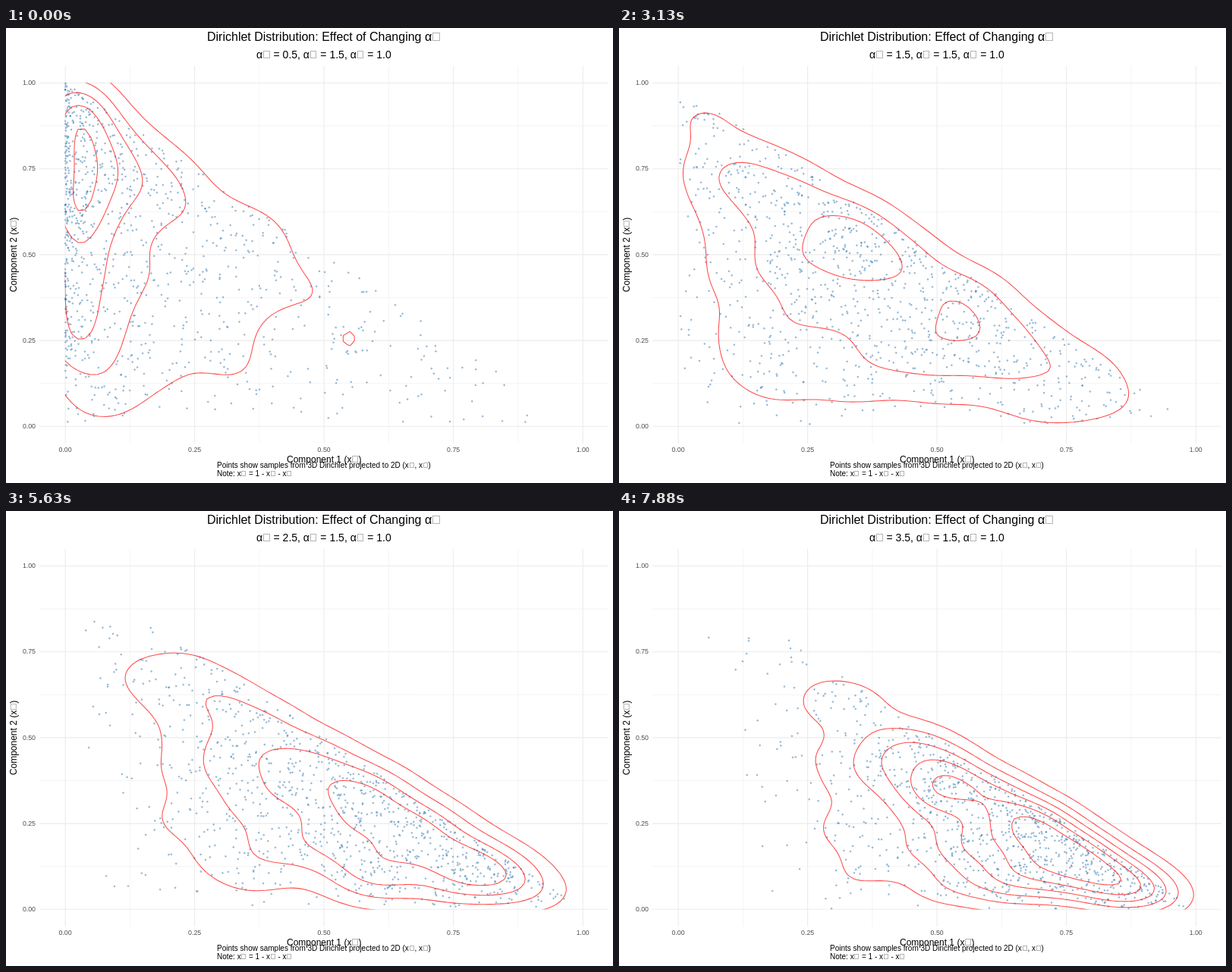
Animation of 800x600 px, one loop 8 s. Source, as an HTML page with a canvas:

```html
<!DOCTYPE html>
<html lang="en">
<head>
<meta charset="utf-8">
<title>Dirichlet Distribution</title>
<style>
html, body { margin: 0; width: 100%; height: 100%; overflow: hidden; background: #fff; }
canvas { position: absolute; left: 0; top: 0; }
p { position: absolute; margin: 0; line-height: 1; white-space: pre; color: #000;
    font-family: "Liberation Sans", Arial, sans-serif; }
i { display: inline-block; box-sizing: border-box; width: .6em; height: .7em;
    margin: 0 .0775em; border: 1px solid #b4b4b4; }
.tick { color: #4d4d4d; }
</style>
</head>
<body>
<canvas id="plot" width="800" height="600"></canvas>
<script>
const start = performance.now();
const STEP = 125, FRAMES = 64, STATES = 16, COUNT = 1000;
const ctx = document.getElementById('plot').getContext('2d');
const px = v => 78.1 + 682.1 * v;
const py = v => 525.3 - 452.8 * v;
const alpha = i => .5 + .2 * i;
const mix = (a, b, t) => [a[0] + (b[0] - a[0]) * t, a[1] + (b[1] - a[1]) * t];
const range = (n, f) => Array.from({ length: n }, (_, i) => f(i));

// ---- labels; "□" stands for a missing glyph box
const boxed = s => s.replace(/□/g, '<i></i>');
function label(text, x, base, size, shift = 0, cls = '') {
  const p = document.createElement('p');
  p.className = cls;
  p.innerHTML = boxed(text);
  p.style.cssText = `left:${x}px;top:${base - .8465 * size}px;font-size:${size}px;` +
    `transform:translateX(${shift}%);transform-origin:0 .8465em`;
  document.body.append(p);
  return p;
}
label('Dirichlet Distribution: Effect of Changing α□', 265, 18, 16);
const subtitle = label('', 330, 40, 14);
label('Component 1 (x□)', 370, 573, 12);
label('Component 2 (x□)', 14, 348.5, 12).style.transform = 'rotate(-90deg)';
label('Points show samples from 3D Dirichlet projected to 2D (x□, x□)', 278, 580, 10);
label('Note: x□ = 1 - x□ - x□', 278, 591, 10);
for (let v = 0; v <= 1; v += .25) {
  label(v.toFixed(2), px(v), 559.5, 8.8, -50, 'tick');
  label(v.toFixed(2), 39, py(v) + 3.2, 8.8, -100, 'tick');
}

// ---- random samples, one set per state
let seed = 20;
function rnd() {
  seed = seed + 0x6D2B79F5 | 0;
  let t = Math.imul(seed ^ seed >>> 15, 1 | seed);
  t = t + Math.imul(t ^ t >>> 7, 61 | t) ^ t;
  return ((t ^ t >>> 14) >>> 0) / 4294967296;
}
const normal = () => Math.sqrt(-2 * Math.log(1 - rnd())) * Math.cos(2 * Math.PI * rnd());
function gamma(a) {
  if (a < 1) return gamma(a + 1) * Math.pow(rnd(), 1 / a);
  const d = a - 1 / 3, c = 1 / Math.sqrt(9 * d);
  for (;;) {
    const x = normal(), v = (1 + c * x) ** 3;
    if (v > 0 && Math.log(1 - rnd()) < x * x / 2 + d - d * v + d * Math.log(v)) return d * v;
  }
}
function dirichlet(...shape) {
  const g = shape.map(gamma), sum = g.reduce((s, v) => s + v);
  return g.map(v => v / sum);
}

// ---- kernel density on a grid reaching past the unit square, so contours close
const G = 121, MIN = -.25, CELL = 1.5 / (G - 1);
const at = i => MIN + i * CELL;

function bandwidth(values) {
  const v = [...values].sort((a, b) => a - b), n = v.length;
  const mean = v.reduce((s, x) => s + x) / n;
  const sd = Math.sqrt(v.reduce((s, x) => s + (x - mean) ** 2, 0) / (n - 1));
  const iqr = v[Math.floor(n * .75)] - v[Math.floor(n * .25)];
  return 1.06 * Math.min(sd, iqr / 1.34) * n ** -.2;
}
// weights of one value on the grid nodes within four bandwidths
function kernel(v, h) {
  const from = Math.max(0, Math.ceil((v - 4 * h - MIN) / CELL));
  const to = Math.min(G - 1, Math.floor((v + 4 * h - MIN) / CELL));
  const w = range(to - from + 1, k =>
    Math.exp(-.5 * ((at(from + k) - v) / h) ** 2) / (h * Math.sqrt(2 * Math.PI)));
  return { from, w };
}
function density(points) {
  const z = new Float64Array(G * G);
  const hx = bandwidth(points.map(p => p[0])), hy = bandwidth(points.map(p => p[1]));
  for (const [x, y] of points) {
    const kx = kernel(x, hx), ky = kernel(y, hy);
    ky.w.forEach((wy, j) => {
      const row = (ky.from + j) * G + kx.from;
      for (let i = 0; i < kx.w.length; i++) z[row + i] += kx.w[i] * wy / points.length;
    });
  }
  return z;
}

// ---- marching squares: link each crossing to the next, then follow the links
function contour(z, level) {
  const link = new Map(), spot = new Map();
  for (let j = 0; j < G - 1; j++) for (let i = 0; i < G - 1; i++) {
    const n = j * G + i, corner = [n, n + 1, n + G + 1, n + G], cross = [];
    corner.forEach((a, k) => {
      const b = corner[(k + 1) % 4], inside = z[a] > level;
      if (inside === z[b] > level) return;
      const id = 2 * Math.min(a, b) + (Math.abs(a - b) === 1 ? 0 : 1);
      const node = m => [px(at(m % G)), py(at(Math.floor(m / G)))];
      spot.set(id, mix(node(a), node(b), (level - z[a]) / (z[b] - z[a])));
      cross.push({ id, inside });
    });
    cross.forEach((c, k) => {
      if (c.inside) link.set(c.id, cross[(k + 1) % cross.length].id);
    });
  }
  const loops = [];
  while (link.size) {
    const line = [];
    let id = link.keys().next().value;
    while (link.has(id)) {
      const next = link.get(id);
      line.push(spot.get(id));
      link.delete(id);
      id = next;
    }
    loops.push(line);
  }
  return loops.sort((a, b) => b.length - a.length).map(resample);
}

// even spacing, starting from the rightmost point, so loops can be blended
function resample(line) {
  const N = 300;
  const first = line.reduce((m, p, i) => p[0] > line[m][0] ? i : m, 0);
  const ring = [...line.slice(first), ...line.slice(0, first), line[first]];
  const len = [0];
  for (let i = 1; i < ring.length; i++)
    len[i] = len[i - 1] + Math.hypot(ring[i][0] - ring[i - 1][0], ring[i][1] - ring[i - 1][1]);
  let j = 1;
  return range(N + 1, k => {
    const s = len[len.length - 1] * k / N;
    while (j < ring.length - 1 && len[j] < s) j++;
    return mix(ring[j - 1], ring[j], (s - len[j - 1]) / (len[j] - len[j - 1] || 1));
  });
}

const states = range(STATES, i => {
  const raw = range(COUNT, () => dirichlet(alpha(i), 1.5, 1));
  const z = density(raw), top = z.reduce((a, b) => Math.max(a, b));
  return {
    points: raw.map(p => [px(p[0]), py(p[1])]),
    levels: range(Math.floor(top), k => contour(z, k + 1))
  };
});

// ---- blending between two states; an unmatched loop grows from its centre
function centre(line) {
  const c = [0, 1].map(d => line.reduce((s, p) => s + p[d], 0) / line.length);
  return line.map(() => c);
}
function blendLevels(a, b, t) {
  return range(Math.max(a.length, b.length), k => {
    const p = a[k] || [], q = b[k] || [];
    return range(Math.max(p.length, q.length), n => {
      const from = p[n] || centre(q[n]), to = q[n] || centre(p[n]);
      return from.map((v, m) => mix(v, to[m], t));
    });
  });
}

// ---- schedule: step at which each state is reached and left
const reach = [0, 5, 10, 15, 19, 25, 29, 33, 37, 41, 45, 49, 53, 56, 60, 63];
const leave = [2, 7, 12, 17, 22, 26, 30, 34, 38, 42, 46, 50, 53, 57, 60, 64];
function progress(step) {
  let i = STATES - 1;
  while (reach[i] > step) i--;
  return step <= leave[i] ? i : i + (step - leave[i]) / (reach[i + 1] - leave[i]);
}

// ---- drawing
function grid() {
  ctx.strokeStyle = '#ebebeb';
  for (let k = 0; k <= 8; k++) {
    const x = px(k / 8), y = py(k / 8);
    ctx.lineWidth = k % 2 ? .53 : 1.07;
    ctx.beginPath();
    ctx.moveTo(x, 50); ctx.lineTo(x, 548);
    ctx.moveTo(44, y); ctx.lineTo(794, y);
    ctx.stroke();
  }
}
function dots(points) {
  ctx.fillStyle = ctx.strokeStyle = 'rgba(70,130,180,.42)';
  ctx.lineWidth = .9;
  for (const [x, y] of points) {
    ctx.beginPath();
    ctx.arc(x, y, .95, 0, 7);
    ctx.fill();
    ctx.stroke();
  }
}
function rings(levels) {
  ctx.save();
  ctx.beginPath();
  ctx.rect(77.8, 72.2, 682.7, 453.4);
  ctx.clip();
  ctx.strokeStyle = 'rgba(255,0,0,.7)';
  ctx.lineWidth = 1.07;
  ctx.lineJoin = 'round';
  for (const line of levels.flat()) {
    ctx.beginPath();
    line.forEach(p => ctx.lineTo(p[0], p[1]));
    ctx.closePath();
    ctx.stroke();
  }
  ctx.restore();
}
function draw(step) {
  const u = progress(step), i = Math.floor(u), t = u - i;
  const a = states[i], b = states[i + 1];
  ctx.clearRect(0, 0, 800, 600);
  grid();
  dots(t ? a.points.map((p, n) => mix(p, b.points[n], t)) : a.points);
  rings(t ? blendLevels(a.levels, b.levels, t) : a.levels);
  subtitle.innerHTML = boxed(`α□ = ${alpha(Math.ceil(u - .5)).toFixed(1)}, α□ = 1.5, α□ = 1.0`);
}

let shown = -1;
function tick(now) {
  const step = Math.floor(Math.max(0, now - start) / STEP) % FRAMES;
  if (step !== shown) draw(shown = step);
  requestAnimationFrame(tick);
}
tick(start);
</script>
</body>
</html>
```
